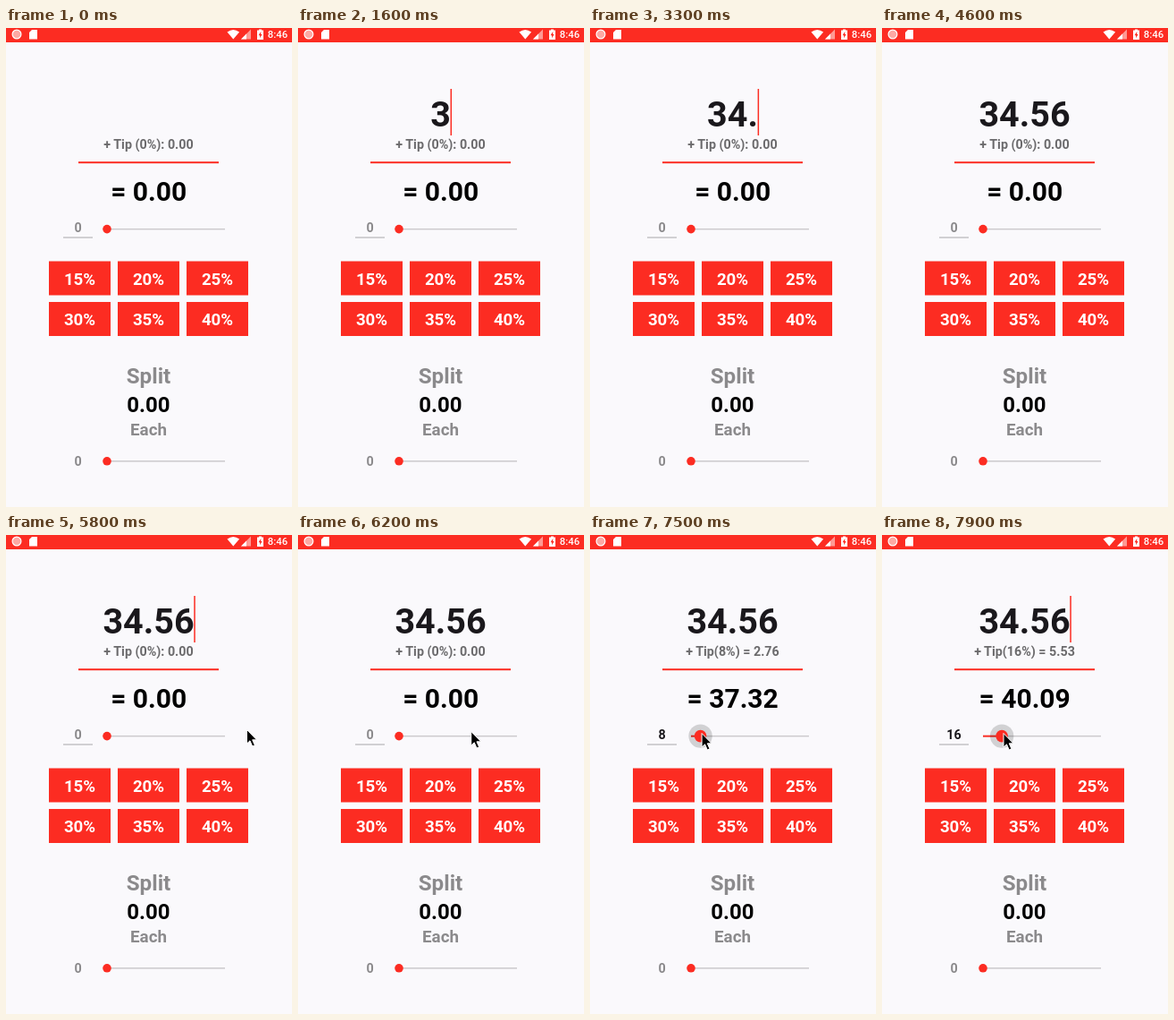
An HTML page for the animation above (8000 ms loop, 320 by 535 pixels).

```html
<!DOCTYPE html>
<html lang="en">
<head>
<meta charset="utf-8">
<title>Tip calculator</title>
<style>
  html, body { margin: 0; width: 100%; height: 100%; overflow: hidden; background: #faf9fc; }
  svg { display: block; width: 320px; height: 535px; }
  text { font-family: Roboto, "Open Sans", sans-serif; font-weight: 700; text-anchor: middle; }
  .red { fill: #fc2c22; }
  .white { fill: #fff; }
  .grey { fill: #8b8a8c; }
  .track { fill: #cccacd; }
</style>
</head>
<body>
<svg viewBox="0 0 320 535">
  <rect width="320" height="535" fill="#faf9fc"/>

  <g id="status">
    <rect class="red" width="320" height="16"/>
    <circle cx="12" cy="7" r="4.9" fill="#fda9a4" stroke="#fff" stroke-width="1.2"/>
    <path class="white" d="M29 2h6v10.500h-9v-7.500z"/>
    <path class="white" d="M247.500 4.500q6.800-5 13.600 0l-6.800 8z"/>
    <path fill="#fe9a94" d="M274 1.500v11h-11z"/>
    <path class="white" d="M269 6.500v6h-6z"/>
    <path class="white" d="M283 1.500h3v1h2v10.500h-7v-10.500h2z"/>
    <path class="red" d="M285.200 4l-2.700 4.200h1.600v3l2.500-4.200h-1.400z"/>
    <text class="white" x="304" y="11.300" font-size="11.300" style="font-weight:500">8:46</text>
  </g>

  <text id="amount" x="159.500" y="110" font-size="39.500" fill="#1a181c"></text>
  <rect id="caret" class="red" y="68" width="1.500" height="52"/>
  <text id="tip" x="159.500" y="135.300" font-size="14.300" fill="#6b6a6c"></text>
  <rect class="red" x="81" y="149.200" width="157" height="2"/>
  <text id="total" x="159.700" y="193" font-size="30"></text>

  <text id="percent" x="80.500" y="228.300" font-size="14.300"></text>
  <rect x="64" y="233.500" width="33" height="1" fill="#aaa8ab"/>
  <rect class="track" x="113" y="223.900" width="132" height="1.500"/>
  <rect id="fill" class="red" x="113" y="223.700" height="1.900"/>
  <circle id="halo" cy="224.600" fill="#000" fill-opacity=".16"/>
  <circle id="thumb" class="red" cy="224.600"/>

  <g id="buttons"></g>

  <text class="grey" x="159.500" y="397" font-size="24.200">Split</text>
  <text x="159.500" y="428.500" font-size="24">0.00</text>
  <text class="grey" x="159.500" y="455" font-size="18.800">Each</text>
  <text class="grey" x="80.500" y="489.300" font-size="14.300">0</text>
  <rect class="track" x="113" y="483.100" width="132" height="1.500"/>
  <circle class="red" cx="113" cy="483.800" r="4.800"/>

  <path id="pointer" d="M0 0v15.500l3.500-3.200 2.700 6.200 2.700-1.200-2.700-6h4.800z" stroke="#fff" stroke-width="1"/>
</svg>

<script>
  const LOOP = 8000, CENTER = 159.5, TRACK_X = 113, TRACK_W = 132, BILL = 34.56;
  const $ = id => document.getElementById(id);
  const set = (id, attrs) => {
    for (const k in attrs) $(id).setAttribute(k, attrs[k]);
  };
  const label = (id, s) => {
    if ($(id).textContent !== s) $(id).textContent = s;
  };

  // Key presses and the moments the caret toggles, starting hidden
  const typed = [[1200, "3"], [2200, "34"], [3100, "34."], [3500, "34.5"], [3800, "34.56"]];
  const toggles = [200, 700, 1200, 1800, 2200, 2700, 3100, 4200, 4800, 5200, 5800, 6200, 6800, 7200, 7800];
  const PRESS = 7200;

  ["15%", "20%", "25%", "30%", "35%", "40%"].forEach((s, i) => {
    const x = 48 + (i % 3) * 77, y = i < 3 ? 260.5 : 306;
    $("buttons").innerHTML +=
      `<rect class="red" x="${x}" y="${y}" width="69" height="38"/>` +
      `<text class="white" x="${x + 34.5}" y="${y + 26}" font-size="18.7">${s}</text>`;
  });

  const progress = (t, from, to) => {
    const p = Math.min(1, Math.max(0, (t - from) / (to - from)));
    return p * p * (3 - 2 * p);
  };

  function draw(t) {
    const entry = typed.filter(([at]) => t >= at).pop();
    label("amount", entry ? entry[1] : "");
    const width = entry ? $("amount").getComputedTextLength() : 2;
    const shown = toggles.filter(at => t >= at).length % 2;
    set("caret", { x: CENTER + width / 2 - 0.3, visibility: shown ? "visible" : "hidden" });

    const approach = progress(t, 5800, 6600);
    const px = 269.5 - 151.5 * approach + 18 * progress(t, PRESS, 7900);
    const py = 217.5 + 4 * approach;
    set("pointer", {
      transform: `translate(${px} ${py})`,
      visibility: t >= 5800 ? "visible" : "hidden"
    });

    const pressed = t >= PRESS;
    const pct = pressed ? Math.round((px - 2 - TRACK_X) / TRACK_W * 100) : 0;
    const tip = BILL * pct / 100;
    const x = TRACK_X + TRACK_W * pct / 100;
    label("tip", pressed ? `+ Tip(${pct}%) = ${tip.toFixed(2)}` : "+ Tip (0%): 0.00");
    label("total", "= " + (pressed ? BILL + tip : 0).toFixed(2));
    label("percent", String(pct));
    set("percent", { fill: pressed ? "#1a181c" : "#8b8a8c" });
    set("fill", { width: x - TRACK_X });
    set("thumb", { cx: x, r: 4.8 + 2 * progress(t, PRESS - 100, PRESS + 200) });
    set("halo", { cx: x, r: 13.2 * progress(t, PRESS - 100, PRESS + 300) });
  }

  const start = performance.now();
  function frame() {
    const t = (performance.now() - start) % LOOP;
    draw(Math.floor(t / 100) * 100); // the screen refreshes ten times a second
    requestAnimationFrame(frame);
  }
  frame();
</script>
</body>
</html>
```
